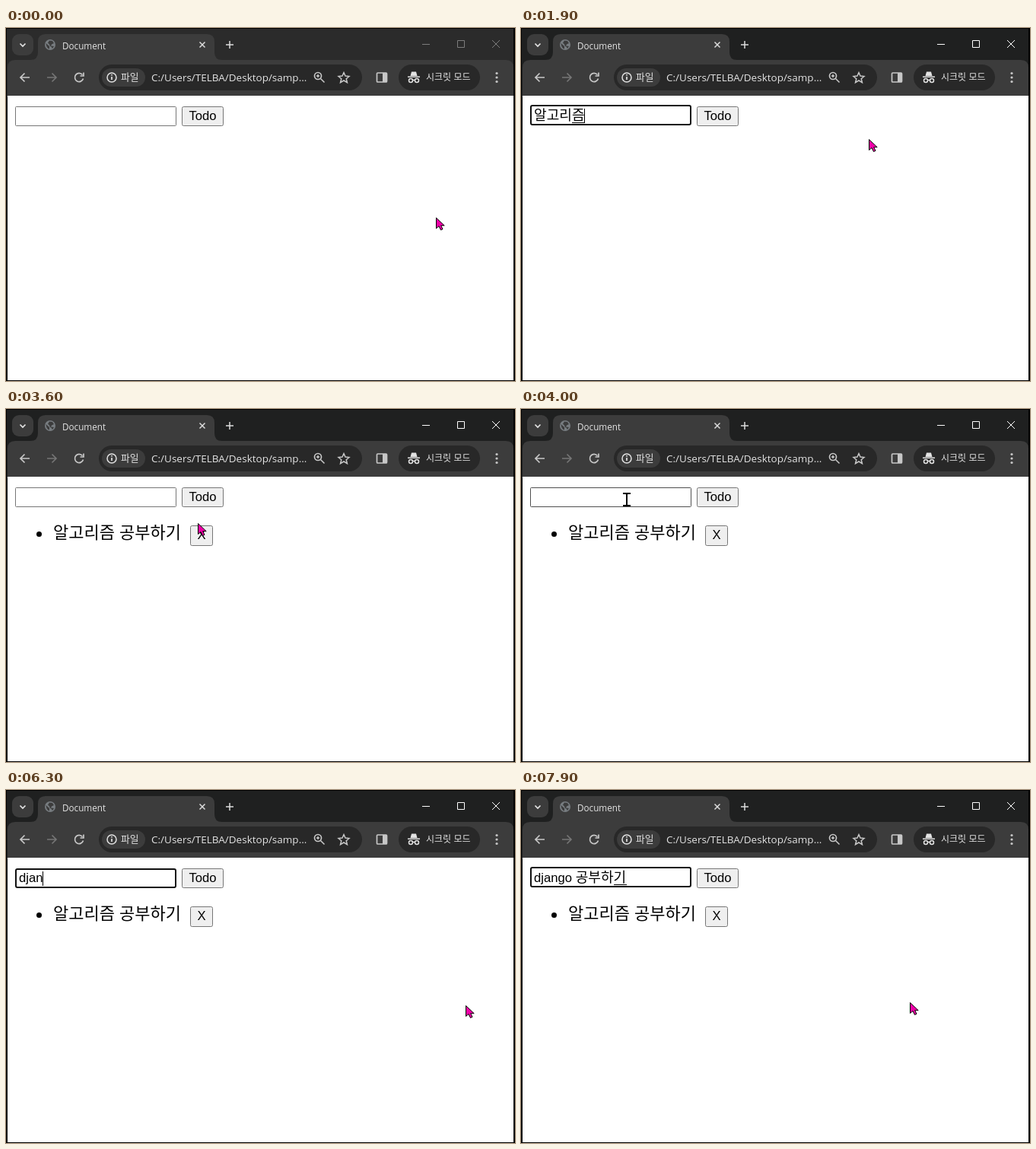
Write an HTML page that moves like this. It is 669 by 464 pixels and loops after 8 s.

```html
<!DOCTYPE html>
<html lang="ko">
<head>
<meta charset="utf-8">
<title>Document</title>
<style>
  html, body { margin: 0; width: 100%; height: 100%; overflow: hidden; background: #000; }
  svg { display: block; width: 100vw; height: 100vh; }
  text { white-space: pre; font-family: "Liberation Sans", Arial, sans-serif; font-size: 16.67px; }
  .ui { font-family: "Open Sans", "Noto Sans", sans-serif; fill: #e3e3e3; }
  .ko { font-family: "Noto Sans CJK KR", "Noto Sans CJK JP", "Noto Sans CJK", sans-serif; }
  #field .ko { font-size: 18.1px; font-weight: 300; }
  .line { fill: none; stroke: #c7c7c7; stroke-width: 1.7; }
  .btn rect { fill: #efefef; stroke: #767676; }
  .btn.hover rect { fill: #e5e5e5; stroke: #4f4f4f; }
  .btn text { text-anchor: middle; }
</style>
</head>
<body>
<svg viewBox="0 0 669 464">
  <rect width="669" height="464"/>
  <!-- tab strip -->
  <rect id="strip" x="1" y="1" width="666" height="90"/>
  <rect x="8" y="8" width="28" height="28" rx="9" fill="#3c3c3c"/>
  <path class="line" d="M18.5 20.5l3.5 3.5 3.5-3.5" style="stroke:#e3e3e3"/>
  <path fill="#3c3c3c" d="M2 89V52q0-10 10-10H32q10 0 10-10V18q0-10 10-10H264q10 0 10 10V32q0 10 10 10H657q10 0 10 10V89z"/>
  <circle cx="58" cy="22" r="7" fill="#777c80"/>
  <path fill="#3c3c3c" d="M52.5 20l4.5 4v3.500q-4-1-4.500-7.500zM57 16.500l4 .500 2 3-3 1.500-1 2 4 .500-2 3q-1-3-3-3l-1-2.500-2-2z"/>
  <text class="ui" x="74" y="27.500" style="font-size:11.700px">Document</text>
  <path class="line" d="M254.500 18.500l7 7m0-7l-7 7M289 22h10m-5-5v10" style="stroke:#dcdcdc;stroke-width:1.500"/>
  <path id="controls" fill="none" d="M547 21.500h10M593.500 16.500h9v9h-9zM639 16l10 10m0-10l-10 10"/>

  <!-- toolbar -->
  <path class="line" d="M31 65H19m5.500-5.500L19 65l5.500 5.500"/>
  <path class="line" d="M54 65h12m-5.500-5.500L66 65l-5.500 5.500" style="stroke:#757575"/>
  <path class="line" d="M100.500 61.500a5.600 5.600 0 1 0 1 5M102 58.500v4.500h-4.500"/>
  <rect x="122" y="48" width="346" height="34" rx="17" fill="#282828"/>
  <rect x="126" y="53" width="57" height="24" rx="12" fill="#3c3c3c"/>
  <circle class="line" cx="139" cy="65" r="6" style="stroke:#e3e3e3;stroke-width:1.500"/>
  <path class="line" d="M139 64v4m0-7v1.600" style="stroke:#e3e3e3"/>
  <text class="ui ko" x="151" y="69" style="font-size:12.800px">파일</text>
  <text class="ui" x="191" y="70" style="font-size:13.500px">C:/Users/TELBA/Desktop/samp...</text>
  <circle class="line" cx="410" cy="63" r="4.500"/>
  <path class="line" d="M413.500 66.500l5 5M408 63h4m-2-2v4" style="stroke-width:1.500"/>
  <path class="line" d="M444 58.500l2 4.500 5 .500-3.800 3.300 1.200 4.900-4.400-2.700-4.400 2.700 1.200-4.900-3.800-3.300 5-.500z" style="stroke-width:1.500"/>
  <rect class="line" x="487.500" y="59" width="13" height="12" rx="1"/>
  <path fill="#c7c7c7" d="M495 59h6v12h-6z"/>
  <rect x="516" y="48" width="107" height="34" rx="17" fill="#282828"/>
  <path fill="#e3e3e3" d="M531.500 63l1.500-5.500h6l1.500 5.500zM528 63.500h16v1.500h-16z"/>
  <g class="line" style="stroke:#e3e3e3;stroke-width:1.500">
    <circle cx="532" cy="69" r="2.500"/><circle cx="540" cy="69" r="2.500"/><path d="M534.500 68.500h3"/>
  </g>
  <text class="ui ko" x="552" y="69" style="font-size:12px">시크릿 모드</text>
  <g fill="#c7c7c7">
    <circle cx="645" cy="59.500" r="1.600"/><circle cx="645" cy="65" r="1.600"/><circle cx="645" cy="70.500" r="1.600"/>
  </g>

  <!-- page -->
  <rect x="2" y="89" width="665" height="374" fill="#fff"/>
  <rect id="box" fill="#fff"/>
  <text id="field" x="17" y="121"></text>
  <rect id="mark" y="124" height="1"/>
  <rect id="caret" width="1" height="19"/>
  <g class="btn" id="add">
    <rect x="231.500" y="103.500" width="54" height="25" rx="2"/>
    <text x="258.500" y="121">Todo</text>
  </g>
  <g id="item">
    <circle cx="43.500" cy="164.500" r="3.500"/>
    <text class="ko" x="62" y="170" style="font-size:22px;font-weight:300">알고리즘 공부하기</text>
    <g class="btn">
      <rect x="242.500" y="153.500" width="29" height="26" rx="2"/>
      <text x="257" y="171">X</text>
    </g>
  </g>
  <path id="arrow" fill="#f000a8" stroke="#000" d="M.5.500v14l3.500-3 2.500 5 2.500-1.200-2.300-4.600h4.500z"/>
  <path id="beam" fill="none" stroke="#000" stroke-width="2" d="M-5-8h4l1 1 1-1h4M0-7V7M-5 8h4l1-1 1 1h4"/>
</svg>
<script>
const $ = id => document.getElementById(id);
const set = (el, attrs) => { for (const k in attrs) el.setAttribute(k, attrs[k]); };
const show = (el, on) => { el.style.display = on ? '' : 'none'; };

const LOOP = 8000, STEP = 100, CLICK = 400, ADD = 3500;

// time, pointer x, pointer y
const moves = [
  [0, 565, 249], [100, 545, 232], [200, 440, 175], [300, 260, 126], [400, 190, 119],
  [500, 330, 131], [600, 457, 146], [3100, 458, 146], [3200, 430, 142], [3300, 350, 128],
  [3400, 268, 114], [3500, 262, 115], [3600, 252, 150], [3700, 238, 205], [3800, 222, 236],
  [3900, 185, 198], [4000, 139, 119], [4300, 141, 120], [4400, 180, 140], [4500, 300, 190],
  [4600, 450, 245], [4700, 570, 280], [4800, 604, 283], [7900, 511, 279]
];

// time, committed text, syllable being composed; null means no focus
const edits = [
  [0, null], [CLICK, ''], [1100, '', '아'], [1300, '', '알'],
  [1500, '알', 'ㄱ'], [1600, '알', '고'], [1700, '알고', '리'], [1800, '알고리', 'ㅈ'],
  [1900, '알고리', '즘'], [2000, '알고리즘 '], [2100, '알고리즘 ', '고'], [2200, '알고리즘 ', '공'],
  [2300, '알고리즘 공', '부'], [2400, '알고리즘 공', '붛'], [2500, '알고리즘 공부', '하'],
  [2600, '알고리즘 공부', '학'], [2700, '알고리즘 공부하', '기'],
  [ADD, null], [4300, ''], [5200, ''],
  [6100, 'd'], [6200, 'dja'], [6300, 'djan'], [6400, 'django'], [6700, 'django '],
  [6800, 'django ', 'ㄱ'], [6900, 'django ', '공'], [7000, 'django 공', '부'],
  [7100, 'django 공', '붛'], [7200, 'django 공부', '하'], [7300, 'django 공부', '학'],
  [7400, 'django 공부하', '기']
];

const latest = (list, t) => list.findLast(e => e[0] <= t);
const inside = (x, y, left, right) => x >= left && x <= right && y >= 103 && y <= 129;

function drawField(t, hover) {
  const [since, text, syllable = ''] = latest(edits, t);
  const focused = text !== null;
  const value = (text || '') + syllable;
  const field = $('field');
  field.innerHTML = value.replace(/[ㄱ-힣]+/g, '<tspan class="ko">$&</tspan>');
  const korean = /[ㄱ-힣]/.test(value);
  const end = 17 + (value ? field.getComputedTextLength() : 0);

  set($('box'), focused
    ? { x: 13, y: korean ? 102 : 104, width: 210, height: korean ? 25 : 24, rx: 2, stroke: '#101010', 'stroke-width': 2 }
    : { x: 12.5, y: 103.5, width: 211, height: 25, rx: 1, stroke: hover ? '#4f4f4f' : '#767676', 'stroke-width': 1 });

  show($('mark'), syllable);
  if (syllable) {
    const start = field.getStartPositionOfChar(value.length - 1).x;
    set($('mark'), { x: Math.round(start), width: Math.round(end - start) });
  }
  show($('caret'), focused && (t - since) % 1000 < 500);
  set($('caret'), { x: Math.round(end - 0.5), y: korean ? 106 : 107 });
}

function draw(now) {
  const t = Math.floor(now % LOOP / STEP) * STEP;
  const [, x, y] = latest(moves, t);
  const active = t >= CLICK;
  const overField = inside(x, y, 12, 224);

  $('strip').setAttribute('fill', active ? '#1f2020' : '#2b2b2b');
  $('controls').setAttribute('stroke', active ? '#fff' : '#7d7d7d');
  drawField(t, overField);
  $('add').classList.toggle('hover', inside(x, y, 231, 286));
  show($('item'), t >= ADD);

  show($('arrow'), !overField);
  show($('beam'), overField);
  set(overField ? $('beam') : $('arrow'), { transform: `translate(${x} ${y})` });
}

const begin = performance.now();
function tick() {
  draw(performance.now() - begin);
  requestAnimationFrame(tick);
}
tick();
</script>
</body>
</html>
```
